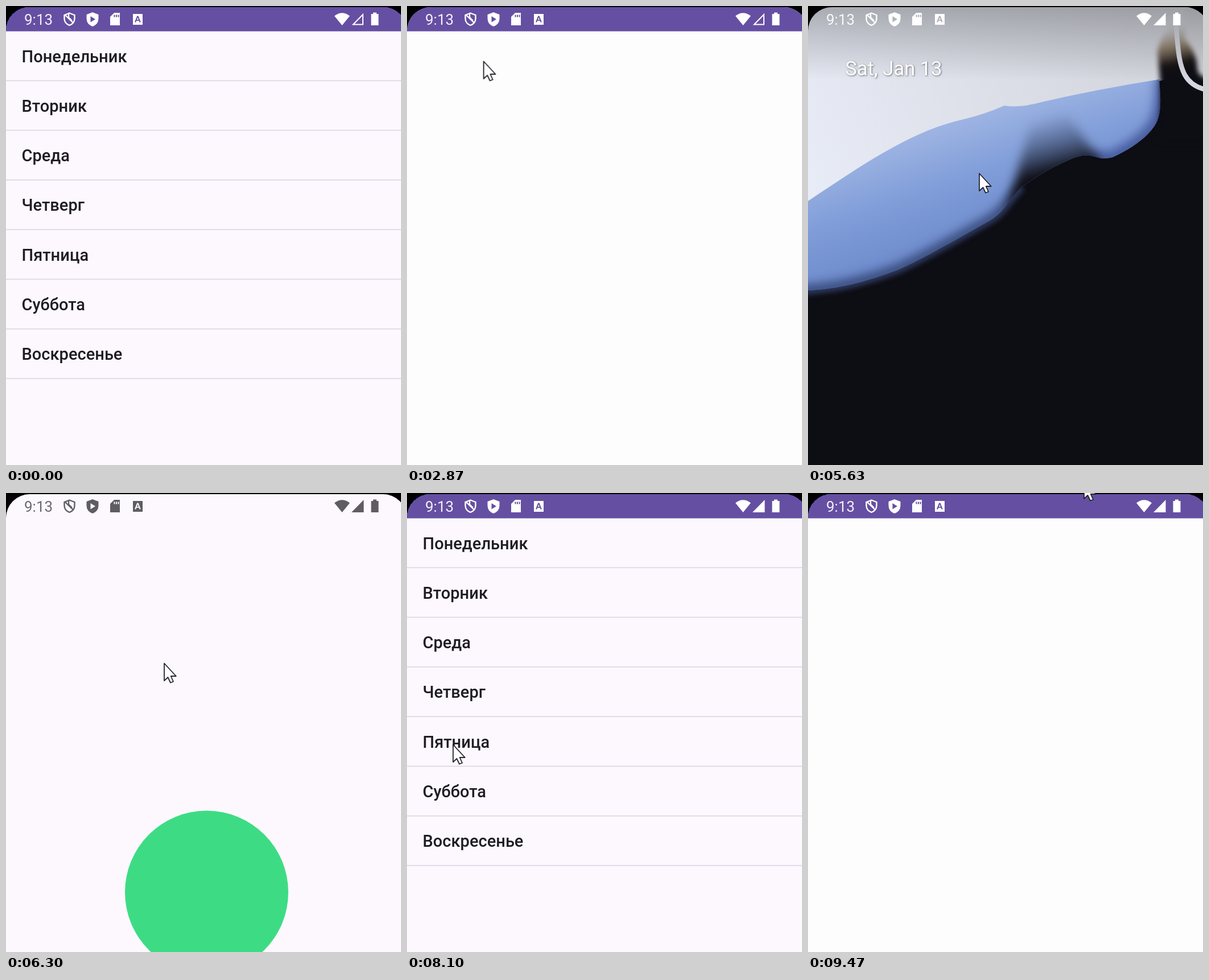
An HTML page that plays this animation: 694 by 807 pixels, repeating every 9730 ms.

```html
<!DOCTYPE html>
<html lang="ru">
<head>
<meta charset="utf-8">
<title>Дни недели</title>
<style>
  html, body { margin: 0; width: 100%; height: 100%; overflow: hidden; background: #000; }
  svg { display: block; width: 694px; height: 807px; font-family: Roboto, sans-serif; }
  filter { color-interpolation-filters: sRGB; }
  .anim { animation: 9730ms linear infinite; }

  .bar { fill: #654fa2; }
  .day { font-size: 29px; font-weight: 500; fill: #1f1d22; }
  .rule { fill: #dcdae6; }
  .date { font-size: 34.5px; fill: #fff; text-shadow: 1px 1px 3px rgba(0,0,0,.5); }
  .clock { font-size: 26px; opacity: .92; }

  #list { animation-name: list; }
  #page { animation-name: page; }
  #splash { animation-name: splash; transform-origin: 352px 702px; }
  #press1 { animation-name: press1; }
  #press5 { animation-name: press5; }
  #status { animation-name: status; fill: currentColor; stroke: none; }
  #weak { animation-name: weak; }
  #strong { animation-name: strong; }
  #cursor { animation-name: cursor; }

  @keyframes list {
    0%, 21% { opacity: 1; }
    21.001%, 71.94% { opacity: 0; }
    73.48%, 100% { opacity: 1; }
  }
  @keyframes page {
    0%, 18.4% { opacity: 0; transform: translate(70px, 0); animation-timing-function: ease-out; }
    20.86%, 39.359% { opacity: 1; transform: none; }
    39.36%, 40.08% { opacity: 1; transform: translate(0, 124px); }
    41.418% { opacity: 1; transform: translate(0, 807px); }
    41.419%, 85.81% { opacity: 0; transform: translate(70px, 0); animation-timing-function: ease-out; }
    88.38%, 100% { opacity: 1; transform: none; }
  }
  @keyframes splash {
    0%, 62.999% { opacity: 0; transform: scale(.35); }
    63% { opacity: .4; transform: scale(.4); }
    63.9% { opacity: 1; transform: scale(.85); }
    64.74%, 74% { opacity: 1; transform: none; }
    74.001%, 100% { opacity: 0; transform: none; }
  }
  @keyframes press1 {
    0%, 16.3% { opacity: 0; }
    17.6%, 20.9% { opacity: 1; }
    21%, 100% { opacity: 0; }
  }
  @keyframes press5 {
    0%, 83.5% { opacity: 0; }
    85%, 88.4% { opacity: 1; }
    88.5%, 100% { opacity: 0; }
  }
  @keyframes status {
    0%, 63.8% { color: #fff; }
    64.4%, 72.2% { color: #5f5d61; }
    73.2%, 100% { color: #fff; }
  }
  @keyframes weak {
    0%, 46.556% { opacity: 1; }
    46.557%, 100% { opacity: 0; }
  }
  @keyframes strong {
    0%, 46.556% { opacity: 0; }
    46.557%, 100% { opacity: 1; }
  }
  @keyframes cursor {
    0%, 9.249% { transform: translate(720px, 124px); }
    9.25% { transform: translate(670px, 124px); }
    9.96% { transform: translate(26px, 118px); }
    9.969%, 14.69% { transform: translate(720px, 170px); animation-timing-function: ease-out; }
    16.03%, 29.49% { transform: translate(128px, 98px); }
    30.52% { transform: translate(476px, -36px); }
    30.53%, 52.41% { transform: translate(480px, -60px); }
    52.415% { transform: translate(480px, 52px); animation-timing-function: ease-out; }
    55.8%, 57.85% { transform: translate(278px, 309px); }
    57.86%, 58.5% { transform: translate(300px, 293px); }
    59.8% { transform: translate(311px, 306px); }
    61.35%, 73.27% { transform: translate(277px, 298px); animation-timing-function: ease-in-out; }
    76.77%, 92.18% { transform: translate(80px, 441px); }
    94.75% { transform: translate(665px, 200px); }
    97.32%, 100% { transform: translate(484px, -22px); }
  }
</style>
</head>
<body>
<svg viewBox="0 0 694 807">
  <defs>
    <clipPath id="screen"><rect y="2" width="704" height="1404" rx="42"/></clipPath>
    <linearGradient id="sky" gradientUnits="userSpaceOnUse" x1="600" y1="60" x2="0" y2="330">
      <stop offset="0" stop-color="#d3d5dd"/>
      <stop offset="1" stop-color="#e8ecf6"/>
    </linearGradient>
    <linearGradient id="scrim" x1="0" y1="0" x2="0" y2="1">
      <stop offset="0" stop-opacity=".26"/>
      <stop offset="1" stop-opacity="0"/>
    </linearGradient>
    <linearGradient id="wave" gradientUnits="userSpaceOnUse" x1="220" y1="190" x2="300" y2="430">
      <stop offset="0" stop-color="#a5bae5"/>
      <stop offset=".5" stop-color="#809dd9"/>
      <stop offset="1" stop-color="#6a87c9"/>
    </linearGradient>
    <linearGradient id="dusk" gradientUnits="userSpaceOnUse" x1="415" y1="195" x2="440" y2="290">
      <stop offset="0" stop-color="#36425f" stop-opacity="0"/>
      <stop offset=".45" stop-color="#36425f" stop-opacity=".5"/>
      <stop offset="1" stop-color="#0d0d14"/>
    </linearGradient>
    <linearGradient id="rust" gradientUnits="userSpaceOnUse" x1="628" y1="36" x2="644" y2="118">
      <stop offset="0" stop-color="#a89a85" stop-opacity="0"/>
      <stop offset=".45" stop-color="#7d6b50" stop-opacity=".8"/>
      <stop offset=".8" stop-color="#1a1516"/>
      <stop offset="1" stop-color="#0d0d14"/>
    </linearGradient>
    <linearGradient id="touch">
      <stop offset="0" stop-color="#e4e1e6"/>
      <stop offset=".3" stop-color="#dfdbe1"/>
      <stop offset=".8" stop-color="#e1dee3"/>
      <stop offset="1" stop-color="#ebe7ec"/>
    </linearGradient>
    <filter id="soft" x="-30%" y="-30%" width="160%" height="160%"><feGaussianBlur stdDeviation="4"/></filter>
    <filter id="smoke" x="-30%" y="-30%" width="160%" height="160%"><feGaussianBlur stdDeviation="9"/></filter>
    <path id="hill" d="M0 343C90 283 180 220 270 200Q312 190 345 175Q370 180 410 169Q510 146 617 129C620 165 622 192 608 212C590 238 555 257 535 266Q520 270 505 265Q485 258 460 270C420 287 395 305 375 318C350 345 345 362 318 378C270 405 205 443 160 463C100 486 50 498 0 500Z"/>
    <path id="shore" d="M-20 502C50 498 100 486 160 463C205 443 270 405 318 378C345 362 350 345 375 318"/>
    <clipPath id="hillClip"><use href="#hill"/></clipPath>
  </defs>

  <rect width="694" height="807"/>
  <g clip-path="url(#screen)">
    <g id="home">
      <rect width="704" height="807" fill="#0d0d14"/>
      <path d="M0 0H704V110L617 132L345 195L0 400Z" fill="url(#sky)"/>
      <use href="#shore" fill="none" stroke="#2b3658" stroke-width="14" filter="url(#soft)"/>
      <use href="#hill" fill="url(#wave)"/>
      <g clip-path="url(#hillClip)" fill="none">
        <use href="#shore" stroke="#30416f" stroke-width="18" filter="url(#smoke)"/>
        <path d="M624 125C624 165 622 195 608 214C590 240 550 262 530 270L490 268" stroke="#45599c" stroke-width="26" filter="url(#smoke)"/>
        <path d="M395 190H455L515 275L440 320L350 365L368 290Z" fill="url(#dusk)" filter="url(#smoke)"/>
      </g>
      <path d="M619 134L614 80Q622 40 650 30H720V240H612Q622 200 619 134Z" fill="url(#rust)" filter="url(#soft)"/>
      <path d="M660 -10H720V124Q690 132 684 112Q684 82 662 58Z" fill="#cfd0d7" filter="url(#soft)"/>
      <path d="M643 0C650 55 648 95 662 121Q674 143 704 148" fill="none" stroke="#d5d6df" stroke-width="8.500"/>
      <rect width="704" height="130" fill="url(#scrim)"/>
      <text class="date" x="65.500" y="122">Sat, Jan 13</text>
    </g>

    <g id="splash" class="anim">
      <rect y="2" width="704" height="1404" rx="42" fill="#fcf8fe"/>
      <circle cx="352.500" cy="702" r="143.500" fill="#3ddc84"/>
    </g>

    <g id="list" class="anim">
      <rect width="704" height="807" fill="#fcf8fe"/>
      <rect class="bar" width="704" height="44.500"/>
      <rect id="press1" class="anim" y="44.500" width="694" height="87" fill="url(#touch)"/>
      <rect id="press5" class="anim" y="393.500" width="694" height="87" fill="url(#touch)"/>
      <g id="days"></g>
    </g>

    <g id="page" class="anim">
      <rect width="704" height="807" fill="#fdfdfe"/>
      <rect class="bar" width="704" height="44.500"/>
    </g>
  </g>

  <g id="status" class="anim">
    <text class="clock" x="32" y="33">9:13</text>
    <g fill="none" stroke="currentColor" stroke-width="2.400">
      <path d="M111.500 12.500L120.500 16V22Q120.500 30.500 111.500 34Q102.500 30.500 102.500 22V16Z"/>
      <path d="M104 16L118.500 30M110 14V20L116 26"/>
    </g>
    <path fill-rule="evenodd" d="M152 11L162.500 15V22Q162.500 32 152 36Q141.500 32 141.500 22V15ZM148.500 18V28.500L157 23.200Z"/>
    <path fill-rule="evenodd" d="M190 12H200V34H183V19ZM189.500 15.500V19.500H191.500V15.500ZM193 15.500V19.500H195V15.500ZM196.500 15.500V19.500H198.500V15.500Z"/>
    <path fill-rule="evenodd" d="M223 14H240V33H223ZM230.200 17.500L226 28.500H228.300L229.200 26H233.600L234.500 28.500H236.800L232.600 17.500ZM231.400 20L232.900 24.200H229.900Z"/>
    <path d="M577 17.500Q590.500 7 604 17.500L590.500 34Z"/>
    <path id="weak" class="anim" d="M610 32.500L627 15V32.500Z" fill="none" stroke="currentColor" stroke-width="2"/>
    <path id="strong" class="anim" d="M607 34L628.500 12V34Z"/>
    <path d="M645 11.500H651V14H654.500V34H641.500V14H645Z"/>
  </g>

  <path id="cursor" class="anim" d="M1 1.500V32L7.500 26L12 35.500L17 33.500L12.700 24H21.800Z" fill="#fff" stroke="#24242e" stroke-width="1.800" stroke-linejoin="round"/>
</svg>
<script>
  const names = ["Понедельник", "Вторник", "Среда", "Четверг", "Пятница", "Суббота", "Воскресенье"];
  const pitch = 87.3;
  document.getElementById("days").innerHTML = names.map((name, i) =>
    `<text class="day" x="27.5" y="${98.5 + pitch * i}">${name}</text>
     <rect class="rule" y="${130.3 + pitch * i}" width="704" height="1.8"/>`).join("");
</script>
</body>
</html>
```
